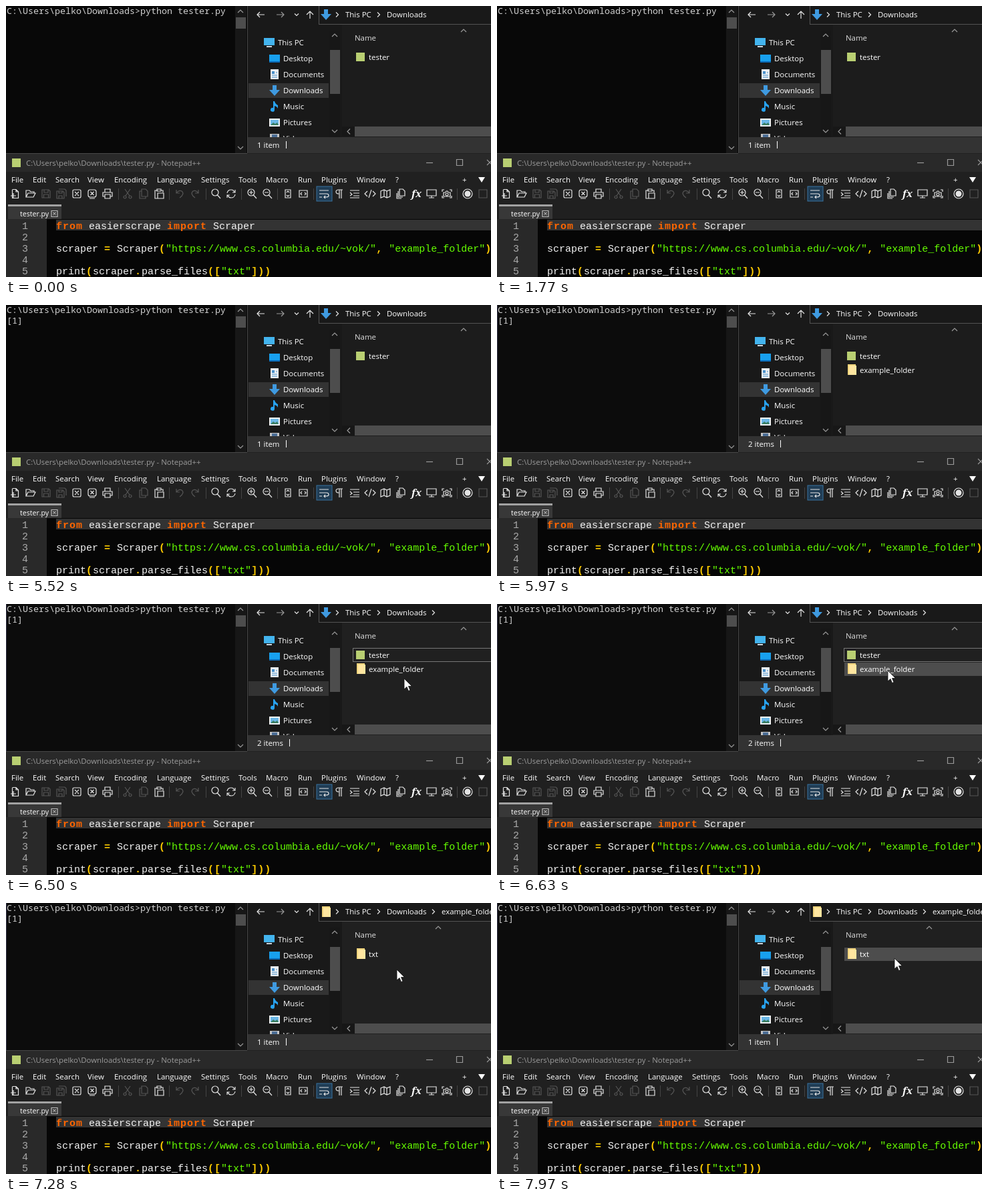
Animation of 726x407 px, one loop 8000 ms. Source, as an HTML page:

```html
<!DOCTYPE html>
<html lang="en">
<head>
<meta charset="utf-8">
<title>Scraper demo</title>
<style>
  html, body { margin: 0; width: 100%; height: 100%; overflow: hidden; background: #000; }
  svg { display: block; width: 726px; height: 407px; }
  text { white-space: pre; }
  .ui { font: 11.45px "Open Sans", "Noto Sans", sans-serif; fill: #fff; }
  .console { font: 13.333px "Noto Sans Mono", "DejaVu Sans Mono", monospace; fill: #d0d0d0; }
  .code { font: 15px "Liberation Mono", monospace; fill: #f4f4f4; }
  .kw, .op { font-weight: bold; letter-spacing: 1px; }
  .kw { fill: #ff6600; }
  .op { fill: #ffcc00; }
  .str { fill: #66ff00; }
  .line { fill: none; stroke: #e4e4e4; stroke-width: 1.2; }
</style>
</head>
<body>
<svg id="stage" viewBox="0 0 726 407"></svg>
<script>
const LOOP = 8000;

const rect = (x, y, w, h, fill, extra = '') =>
  `<rect x="${x}" y="${y}" width="${w}" height="${h}" fill="${fill}" ${extra}/>`;
const text = (x, y, s, cls = 'ui', extra = '') => `<text x="${x}" y="${y}" class="${cls}" ${extra}>${s}</text>`;
const line = (x, y, d, extra = '') => `<path class="line" transform="translate(${x} ${y})" d="${d}" ${extra}/>`;
const tint = color => `style="stroke:${color}"`;
// Shown only during the given "from-to" spans in ms.
const during = (spans, content) => `<g data-on="${spans}">${content}</g>`;

const RIGHT = 'M-2-3.5L1.5 0L-2 3.5', UP = 'M-4 2L0-2L4 2', DOWN = 'M-4-2L0 2L4-2', LEFT = 'M2-4L-2 0L2 4';
const gray = tint('#999');

// ---------- editor ----------
const PAGE = 'M-4-6.5H1L4.5-3V6.5H-4.5V-6.5M1-6.5V-3H4.5';
const SAVE = 'M-6-6H4L6-4V6H-6ZM-3-6V-2H3V-6M-3.5 6V1H3.5V6';
const LENS = 'M4-2A5 5 0 1 1-6-2A5 5 0 1 1 4-2M2.5 2L7 7';
const BOX = 'M-6-4Q-6-6-4-6H4Q6-6 6-4V4Q6 6 4 6H-4Q-6 6-6 4Z';
const TOOLS = [
  [14, PAGE + 'M-7 3H1M-3-1V7'],
  [37, 'M-7 5V-5H-2L0-3H5V-1M-7 5L-4-1H7L4 5Z'],
  [60, SAVE, 1],
  [83, 'M-4-7H5L7-5V4M-7-4H2L4-2V7H-7ZM-4-4V-1H1V-4M-4 7V3H1V7', 1],
  [106, BOX + 'M-3-3L3 3M3-3L-3 3'],
  [129, 'M-6-3Q-6-6-3-6H3Q6-6 6-3V2Q6 5 3 5H-3Q-6 5-6 2ZM-2.5-3L2.5 2M2.5-3L-2.5 2M-4 7H4'],
  [152, 'M-4-2V-7H4V-2M-4 4H-7V-2H7V4H4M-4 1H4V7H-4Z'],
  [182, 'M-4-7L3 3M4-7L-3 3M-2 5A2 2 0 1 1-6 5A2 2 0 1 1-2 5M6 5A2 2 0 1 1 2 5A2 2 0 1 1 6 5', 1],
  [206, 'M-3-7H3L6-4V4H-3ZM-3-4H-6V7H3V4', 1],
  [229, 'M-2-5H-6V7H-2M3-5H6V-2M-3-7H3V-4H-3ZM-2-1H7V7H-2Z'],
  [260, 'M-5-6V-1H0M-5-1Q-1-6 3-4Q8 0 0 6', 1],
  [283, 'M5-6V-1H0M5-1Q1-6-3-4Q-8 0 0 6', 1],
  [314, LENS],
  [337, 'M-6-1Q-5-6 0-6Q4-6 5-2M6-6V-2H2M6 1Q5 6 0 6Q-4 6-5 2M-6 6V2H-2'],
  [368, LENS + 'M-4-2H2M-1-5V1'],
  [391, LENS + 'M-4-2H2'],
  [422, 'M-4-6H4V6H-4ZM-2-2L0-4L2-2M-2 2L0 4L2 2'],
  [445, 'M-6-5H6V5H-6ZM-2-2L-4 0L-2 2M2-2L4 0L2 2'],
  [476, 'M-7-5H7M-7 0H4Q7 0 7 3Q7 5 3 5H0M2 3L0 5L2 7M-7 5H-3'],
  [499, 'M5-6H-1Q-5-6-5-3Q-5 0-1 0H0M0-6V7M3-6V7'],
  [522, 'M-7-5H7M-2-1H7M-2 3H7M-7 6H7M-7-2L-4 1L-7 3'],
  [545, 'M-4-4L-8 0L-4 4M4-4L8 0L4 4M2-6L-2 6'],
  [568, 'M-7-4L-2-6L2-4L7-6V4L2 6L-2 4L-7 6ZM-2-6V4M2-4V6'],
  [591, 'M-2-7H3L6-4V3H-2ZM-4-4V5H3M-6-1V7H1'],
  [637, 'M-7-6H7V3H-7ZM-4 6H4M0 3V6'],
  [660, 'M-7-3V-6H-4M4-6H7V-3M7 3V6H4M-4 6H-7V3M-5-2H-2L-1-4H1L2-2H5V4H-5ZM2 1A2 2 0 1 1-2 1A2 2 0 1 1 2 1'],
  [714, 'M-6-6H6V6H-6Z', 1],
];
const MENU = [[8, 'File'], [40, 'Edit'], [74, 'Search'], [122, 'View'], [162, 'Encoding'], [226, 'Language'],
  [292, 'Settings'], [348, 'Tools'], [389, 'Macro'], [437, 'Run'], [472, 'Plugins'], [525, 'Window'], [583, '?'], [683, '+']];

const span = cls => s => `<tspan class="${cls}">${s}</tspan>`;
const kw = span('kw'), op = span('op'), str = span('str');
const CODE = [
  `${kw('from')} easierscrape ${kw('import')} Scraper`,
  '',
  `scraper ${op('=')} Scraper${op('(')}${str('"https://www.cs.columbia.edu/~vok/"')}${op(',')} ${str('"example_folder"')}${op(')')}`,
  '',
  `print${op('(')}scraper${op('.')}parse_files${op('([')}${str('"txt"')}${op(']))')}`,
];

const appMark = (x, y) => rect(x, y, 13, 13, '#b9cf72');

const editor = () => [
  rect(0, 221, 726, 100, '#202020'), rect(0, 222, 726, 27, '#292929'),
  appMark(9, 229),
  text(30, 240, 'C:\\Users\\pelko\\Downloads\\tester.py - Notepad++', 'ui', 'style="fill:#9c9c9c"'),
  line(634, 235.5, 'M-5 0H5', gray), line(679, 235, 'M-4.5-4.5H4.5V4.5H-4.5Z', gray),
  line(724, 235, 'M-4-4L4 4M4-4L-4 4', gray),
  ...MENU.map(([x, s]) => text(x, 265, s)),
  '<path d="M707 257h10l-5 8z" fill="#fff"/>',
  rect(465, 271, 23, 22, '#203d55', 'stroke="#39739f"'),
  ...[168, 244, 299, 352, 406, 460, 675].map(x => rect(x, 274, 1, 17, '#444')),
  ...TOOLS.map(([x, d, off]) => line(x, 282, d, off ? tint('#555') : '')),
  text(607, 287, 'fx', 'ui', 'style="font:italic bold 15px \'Noto Serif\',serif"'),
  '<circle cx="691" cy="282" r="7" class="line"/><circle cx="691" cy="282" r="4.5" fill="#e4e4e4"/>',
  rect(3, 298, 80, 23, '#383838'), rect(3, 298, 80, 3, '#a2a2a2'),
  text(21, 316, 'tester.py', 'ui', 'style="font-size:10.6px"'),
  line(72.5, 312, 'M-4.5-4.5H4.5V4.5H-4.5ZM-2-2L2 2M2-2L-2 2', tint('#bbb')),
  rect(0, 320, 726, 87, '#060606'), rect(0, 320, 61, 87, '#292929'), rect(75, 321, 651, 16, '#333'),
  ...CODE.map((s, i) => text(24, 334.5 + 17 * i, i + 1, 'code', 'style="fill:#aaa"') + text(75, 334.5 + 17 * i, s, 'code')),
].join('');

// ---------- console ----------
const consoleWindow = () => [
  rect(0, 0, 361, 222, '#080808'),
  during('5970-8000', rect(0, 0, 361, 222, '#0c0c0c') + rect(0, 0, 1, 221, '#34344a')),
  rect(343, 0, 17, 221, '#171717'), rect(344, 17, 15, 17, '#4d4d4d'),
  line(351, 8, UP, gray), line(351, 213, DOWN, gray),
  rect(0, 221, 361, 1, '#484848'),
  text(1, 12, 'C:\\Users\\pelko\\Downloads&gt;python tester.py', 'console'),
  during('4580-8000', text(1, 28, '[1]', 'console')),
  during('130-640 1190-1770 2320-2840 3410-3860 4430-4580', rect(1, 27, 8, 4, '#d8d8d8')),
  during('4580-5520', rect(1, 43, 8, 4, '#d8d8d8')),
].join('');

// ---------- file explorer ----------
const folder = (x, y) => rect(x, y, 12, 16, '#f3d47b') + rect(x + 2, y + 2, 11, 14, '#ffe6a0');
const download = (x, y) =>
  `<path transform="translate(${x} ${y})" d="M-3-8H3V-1H8L0 8L-8-1H-3Z" fill="#3f9ae0"/>`;
const status = (label, x) => text(376, 213, label) + rect(x, 203, 1, 11, '#fff');

const SIDEBAR = [
  [55, 407, 'This PC', rect(386, 48, 16, 11, '#43b4ee') + rect(390, 60, 8, 2, '#c8d4dc')],
  [79, 415, 'Desktop', rect(394, 73, 16, 12, '#18a0ee') + rect(394, 83, 16, 2, '#0b69b5')],
  [103, 415, 'Documents', rect(396, 95, 12, 15, '#e9eef2') + rect(398, 98, 4, 4, '#4b92cc')
    + line(402, 104, 'M-4 0H4M-4 3H4M2-4H4', tint('#4b92cc'))],
  [127, 415, 'Downloads', download(402, 127)],
  [151, 415, 'Music', '<path d="M400 143h2q1 4 5 6v5q-1-3-5-4v6a3 3 0 1 1-2-3z" fill="#28a3f0"/>'],
  [175, 415, 'Pictures', rect(394, 169, 16, 12, '#eef3f6') + rect(396, 171, 12, 8, '#6bb8e8')
    + '<path d="M396 179l4-4 3 2 3-2 2 4z" fill="#3a7e62"/>'],
  [199, 415, 'Videos', rect(395, 192, 14, 12, '#c4c4c4') + rect(398, 193, 8, 10, '#4b6e96')],
];

const explorer = () => [
  rect(361, 0, 365, 221, '#191919'), rect(361, 0, 1, 221, '#494949'),
  rect(503, 28, 223, 169, '#1c1c1c'),
  during('6110-8000', rect(503, 28, 223, 169, '#202020')),
  line(381, 13, 'M6 0H-5M-1-4L-5 0L-1 4', 'stroke-width="1.6"'),
  line(411, 13, 'M-6 0H5M1-4L5 0L1 4', gray), line(435, 13, 'M-3-1.5L0 1.5L3-1.5'),
  line(455, 13, 'M0 6V-5M-5 0L0-5L5 0'),
  rect(468.5, -1, 270, 28.5, 'none', 'stroke="#535353"'),
  line(496, 13, RIGHT), text(508, 17, 'This PC'), line(558, 13, RIGHT), text(570, 17, 'Downloads'),
  during('0-7280', download(479, 13)),
  during('7280-8000', folder(473, 5) + text(652, 17, 'example_folder')),
  during('6110-8000', line(640, 13, RIGHT)),

  rect(363, 116, 120, 22, '#333'),
  ...SIDEBAR.map(([y, x, label, icon]) => icon + text(x, y + 4, label)),
  rect(484, 37, 16, 160, '#171717'), rect(485, 66, 15, 66, '#4d4d4d'),
  line(492, 44, UP, gray), line(492, 188, DOWN, gray),
  rect(503, 181, 223, 15, '#171717'), rect(522, 181, 204, 15, '#4d4d4d'), line(513, 188.5, LEFT, gray),

  text(522, 52, 'Name', 'ui', 'style="fill:#dedede"'),
  during('0-7280', line(685, 37, UP, gray)), during('7280-8000', line(647, 37, UP, gray)),

  during('6630-6880', rect(520, 88, 206, 20, '#4d4d4d')),
  during('6880-7280', rect(520, 88, 206, 20, '#777')),
  during('6110-6880', rect(519.5, 66.5, 210, 20, 'none', 'stroke="#777"')),
  during('0-7280', appMark(524, 70) + text(543, 81, 'tester')),
  during('5690-7280', folder(525, 89) + text(543, 102, 'example_folder')),
  during('7670-7970', rect(520, 67, 206, 20, '#454545')),
  during('7970-8000', rect(520, 67, 206, 20, '#4d4d4d')),
  during('7280-8000', folder(525, 68) + text(543, 81, 'txt')),

  rect(362, 197, 364, 24, '#333'),
  during('0-5690 7280-8000', status('1 item', 419)),
  during('5690-7280', status('2 items', 424)),
  during('6880-7280', text(435, 213, '1 item selected') + rect(524, 203, 1, 11, '#fff')),
].join('');

// ---------- pointer and playback ----------
const POINTER = [[6110, 628, 130], [6370, 612, 122], [6500, 596, 112], [6630, 585, 100], [7670, 587, 85], [7820, 595, 83]];

const stage = document.getElementById('stage');
stage.innerHTML = editor() + consoleWindow() + explorer() +
  '<path id="pointer" d="M0 0V16L4 12.5L6.5 18.5L9 17.5L6.5 11.5H11.5Z" fill="#fff" stroke="#111" stroke-width=".8"/>';
const pointer = document.getElementById('pointer');
const parts = [...stage.querySelectorAll('[data-on]')].map(el => ({
  el, spans: el.dataset.on.split(' ').map(s => s.split('-').map(Number)),
}));

function draw(t) {
  for (const { el, spans } of parts) {
    el.style.display = spans.some(([from, to]) => t >= from && t < to) ? '' : 'none';
  }
  const step = POINTER.filter(([at]) => at <= t).pop();
  pointer.style.display = step ? '' : 'none';
  if (step) pointer.setAttribute('transform', `translate(${step[1]} ${step[2]})`);
}

const start = performance.now();
function tick(now) {
  draw(Math.max(0, now - start) % LOOP);
  requestAnimationFrame(tick);
}
draw(0);
requestAnimationFrame(tick);
</script>
</body>
</html>
```
